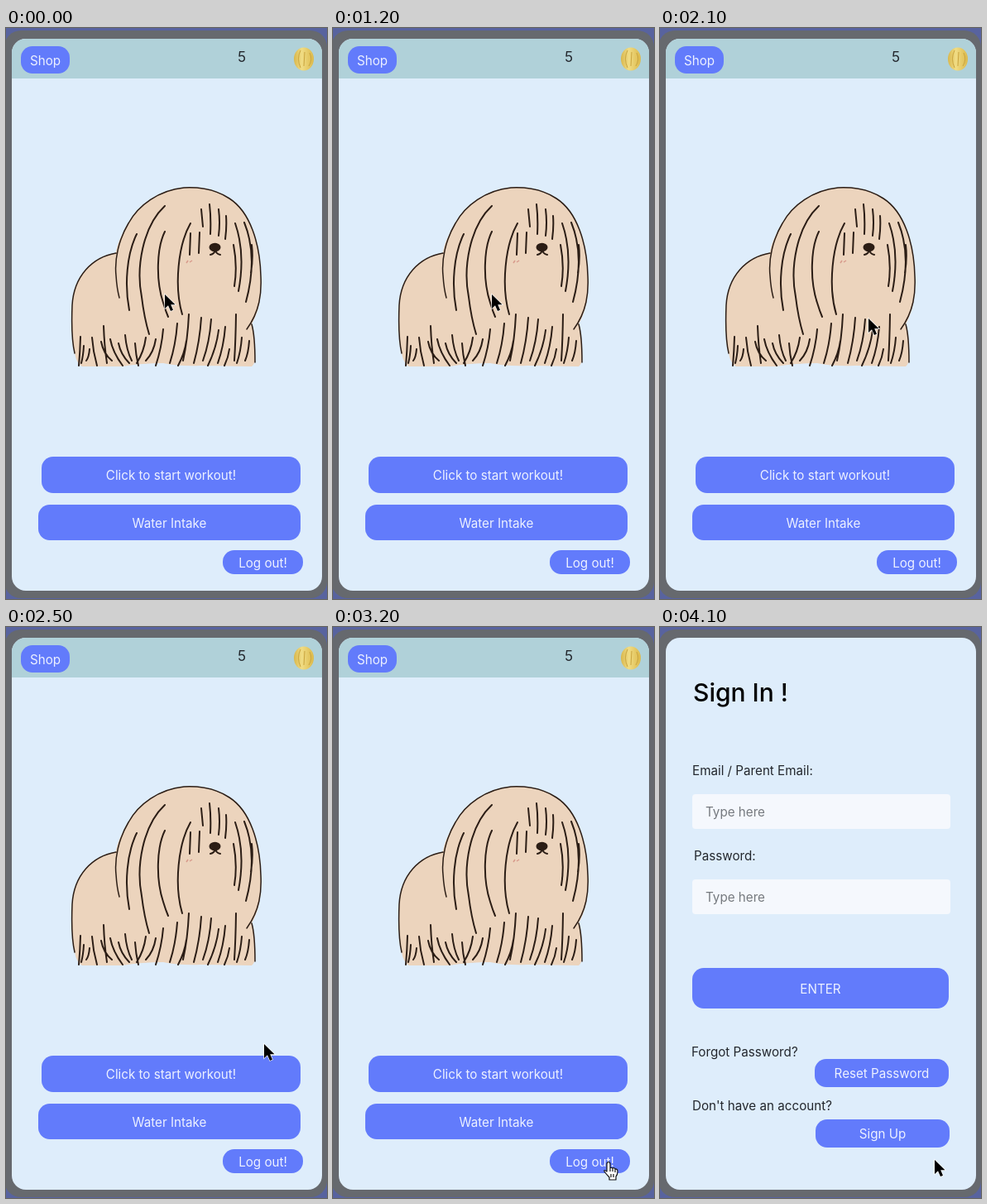
An HTML page for the animation above (4400 ms loop, 388x690 px).

```html
<!DOCTYPE html>
<html>
<head>
<meta charset="utf-8">
<style>
  html, body { margin: 0; width: 100%; height: 100%; overflow: hidden; background: #58639f; }
  svg { display: block; }
  text { font-family: Inter, sans-serif; font-size: 15.2px; fill: #23272d; }
  .button rect { fill: #627bfb; }
  .button text { fill: #edf1ff; text-anchor: middle; }
  .field rect { fill: #f5f8fd; }
  .field text { fill: #75797e; }
  .ink { fill: none; stroke: #2b1d15; stroke-width: 2; stroke-linecap: round; stroke-linejoin: round; }
</style>
</head>
<body>
<svg width="388" height="690" viewBox="0 0 388 690">
  <defs>
    <clipPath id="screen"><rect x="7" y="13" width="375" height="667" rx="17"/></clipPath>
    <linearGradient id="gold">
      <stop offset="0" stop-color="#d9b74c"/>
      <stop offset=".4" stop-color="#f0dc84"/>
      <stop offset="1" stop-color="#dcb94a"/>
    </linearGradient>
  </defs>
  <rect x="-2" y="3" width="390" height="686" rx="20" fill="#66696e"/>
  <g clip-path="url(#screen)"><rect width="388" height="690" fill="#deedfb"/><rect id="bar" width="388" height="61" fill="#b0d1d9"/></g>

  <g id="home">
    <text x="280" y="41" font-size="17" style="font-size:17px">5</text>
    <ellipse cx="360" cy="37.5" rx="12" ry="14" fill="url(#gold)"/>
    <path d="M356 27Q351 37 356 48M361 29L360 46M367 30Q371 38 366 46" fill="none" stroke="#c9a43e" stroke-width="1"/>
    <path fill="#ecd4bd" d="M133 272C104 277 82 300 80 335C79 360 80 380 83 393Q85 405 92 409L140 409Q165 405 190 405Q210 409 235 408L297 409Q302 406 301 392Q301 372 297 358C307 340 309 320 308 300C307 260 295 222 270 206C255 196 235 192 215 193C185 196 160 214 148 236C138 254 132 262 132 285Z"/>
    <path class="ink" style="stroke-width:1.5" d="M133 272C104 277 82 300 80 335C79 360 80 380 83 393M301 404Q301 372 297 358M291 364C307 342 309 320 308 300C307 260 295 222 270 206C255 196 235 192 215 193C185 196 160 214 148 236C136 256 131 280 133 299Q134 315 137 326"/>
    <path class="ink" d="M158 249C146 273 143 310 149 341M192 215C165 240 157 290 164 325Q167 350 173 370M192 246C182 266 181 305 190 332Q193 342 196 349M223 236C208 262 203 312 213 346M223 248L222 274M234 247L233 272M236 219L238 240M246 213Q248 230 247 249M257 219Q259 235 257 251M266 227Q267 240 265 255M277 236C286 262 286 292 281 318M288 235C299 262 300 294 290 331M275 262Q280 288 276 312M297 262Q299 278 296 296"/>
    <path id="fringe" class="ink"/>
    <ellipse cx="252.5" cy="265" rx="7" ry="5.2" fill="#2b1d15"/>
    <path class="ink" d="M247 274Q252 273 253 268Q254 273 259 274"/>
    <path d="M218 284L220 281M222 283L225 281" stroke="#d79a8c" stroke-width="1.5"/>
  </g>

  <g id="signIn">
    <text x="40" y="90" style="font-size:30px;font-weight:500;fill:#000">Sign In !</text>
    <text x="39" y="179" class="label">Email / Parent Email:</text>
    <text x="41" y="282" class="label">Password:</text>
    <text x="38" y="519" class="label">Forgot Password?</text>
    <text x="39" y="584" class="label">Don't have an account?</text>
  </g>

  <path id="arrow" d="M0 0V17L4 13.3L7 20L10 18.7L7.2 12.3H12.5Z" stroke="#fff" stroke-width="1.3" paint-order="stroke"/>
  <path id="hand" transform="translate(327 646)" fill="#fff" stroke="#111" stroke-width="1.2" stroke-linejoin="round"
    d="M4 12V3Q4 .5 6 .5T8 3V8Q9 6.5 11 8Q13 7 14 9Q17 8.5 17 12Q17 16 15 18V22H7V19Q4 16 1 12Q0 9 4 12ZM8 8V12M11 8V12M14 9V13M9 15V19M12 15V19"/>
</svg>
<script>
const $ = id => document.getElementById(id);

function box(parent, kind, x, y, w, h, rx, label, tx, ty) {
  $(parent).insertAdjacentHTML('beforeend',
    `<g class="${kind}"><rect x="${x}" y="${y}" width="${w}" height="${h}" rx="${rx}"/><text x="${tx}" y="${ty}">${label}</text></g>`);
  return $(parent).lastElementChild;
}
const button = (parent, x, y, w, h, label, rx = 14) =>
  box(parent, 'button', x, y, w, h, rx, label, x + w / 2, y + h / 2 + 6);
const field = y => box('signIn', 'field', 39, y, 312, 42, 4, 'Type here', 55, y + 27);

button('home', 18, 22, 59, 33, 'Shop');
button('home', 43, 518, 313, 44, 'Click to start workout!');
button('home', 39, 576, 317, 43, 'Water Intake');
const logOut = button('home', 262, 631, 97, 29, 'Log out!');
field(202);
field(305);
button('signIn', 39, 412, 310, 49, 'ENTER');
button('signIn', 187, 522, 162, 34, 'Reset Password');
button('signIn', 188, 595, 162, 34, 'Sign Up');

// Locks along the bottom: top x, top y, sideways drift
const locks = [
  [90, 373, -2], [94, 384, -3], [101, 388, -4], [104, 374, 6], [118, 360, 4], [115, 379, 13],
  [126, 376, 15], [136, 381, 13], [144, 371, 8], [156, 381, 4], [169, 374, -11], [181, 376, -12],
  [190, 364, -9], [207, 357, -9], [221, 346, -7], [218, 378, -10], [236, 350, -9], [248, 352, -10],
  [257, 365, -13], [265, 361, -9], [278, 346, -2], [270, 388, -6], [285, 374, -6], [294, 378, -5]
];
$('fringe').setAttribute('d', locks.map(([x, y, dx], i) =>
  `M${x} ${y}Q${x + dx * .2} ${(y + 408) / 2} ${x + dx} ${408 - i % 3 * 3}`).join(''));

// Pointer stops: time, x, y
const stops = [[1700, 192, 322], [2100, 252, 351], [2500, 312, 504], [2900, 332, 644]];
function pointerAt(t) {
  const next = stops.findIndex(s => s[0] > t);
  if (next < 1) return stops.at(next).slice(1);
  const [t0, x0, y0] = stops[next - 1], [t1, x1, y1] = stops[next];
  const p = (t - t0) / (t1 - t0);
  return [x0 + (x1 - x0) * p, y0 + (y1 - y0) * p];
}

const show = (id, on) => $(id).style.display = on ? '' : 'none';

function draw(now) {
  const t = Math.floor(now % 4400 / 100) * 100;
  const signedOut = t >= 4100, hovering = t >= 3200 && t < 4000;
  show('home', !signedOut);
  show('bar', !signedOut);
  show('signIn', signedOut);
  show('hand', hovering);
  show('arrow', !hovering);
  logOut.style.opacity = t >= 3800 ? .2 : 1;
  $('arrow').setAttribute('transform', `translate(${pointerAt(t)})`);
  requestAnimationFrame(draw);
}
requestAnimationFrame(draw);
</script>
</body>
</html>
```
